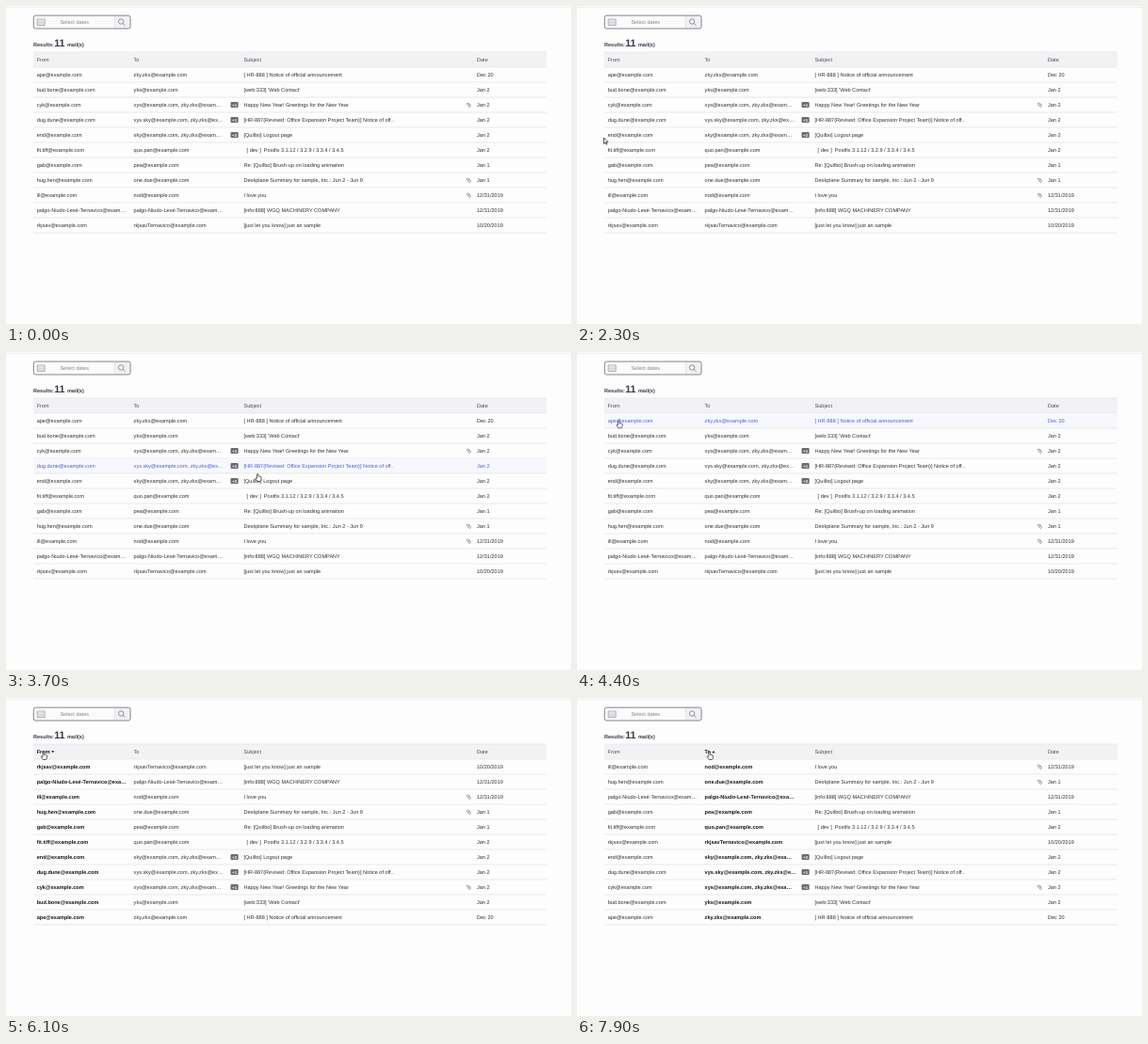
An HTML page for the animation above (8 s loop, 600x338 px).

```html
<!DOCTYPE html>
<html lang="en">
<head>
<meta charset="utf-8">
<title>Mail list</title>
<style>
  html, body { margin: 0; width: 100%; height: 100%; overflow: hidden; background: #fefdfe; }
  svg { display: block; }
  text { font: 5.57px "Liberation Sans", Arial, sans-serif; white-space: pre; text-rendering: geometricPrecision; fill: #303033; }
  .bold { font-weight: bold; fill: #161618; }
  .head text { fill: #4c4c50; }
  .head .bold { fill: #161618; }
  .results text { font-weight: bold; fill: #343a46; }
  .results .count { font-size: 10.8px; }
  .hint { fill: #85848a; }
  .badge { font-size: 4.4px; font-weight: bold; fill: #fff; }
  .hover text:not(.badge) { fill: #5757dc; }
  .icon { fill: none; stroke: #6c6b70; stroke-width: .7; }
</style>
</head>
<body>
<svg width="600" height="338" viewBox="0 0 600 338">
  <path d="M0 1.5H600" stroke="#efeef0"/>
  <rect x="29.3" y="10.1" width="102.8" height="13.9" rx="2.2" fill="#fbfafc"/>
  <path d="M115.5 10.1H129.9a2.2 2.2 0 0 1 2.2 2.2V21.8a2.2 2.2 0 0 1-2.2 2.2H115.5Z" fill="#f1f0f3"/>
  <path d="M115.5 10.6V23.5" stroke="#dddce0" stroke-width=".7"/>
  <rect x="29.3" y="10.1" width="102.8" height="13.9" rx="2.2" fill="none" stroke="#77767a" stroke-width=".9"/>
  <path class="icon" d="M33.2 14H41.2V20.6H33.2Z" style="stroke-width:.5"/>
  <path class="icon" d="M33.2 15.7H41.2M33.2 17.3H41.2M33.2 18.9H41.2M35.2 15.7V20.6M37.2 15.7V20.6M39.2 15.7V20.6" style="stroke-width:.2"/>
  <text class="hint" x="57.4" y="18.9">Select dates</text>
  <g class="icon"><circle cx="122.2" cy="16.5" r="2.7"/><path d="M124.2 18.5L126.6 20.9"/></g>
  <g class="results">
    <text x="29" y="43">Results:</text>
    <text class="count" x="51.2" y="43.2">11</text>
    <text x="64.9" y="43">mail(s)</text>
  </g>
  <g id="table"></g>
  <g id="cursor" fill="#fff" stroke="#111" stroke-width=".7" stroke-linejoin="round">
    <path id="arrow" d="M0 0V6.3L1.5 5L2.5 7.2L3.5 6.8L2.5 4.6H4.4Z"/>
    <path id="hand" transform="translate(.3 -.5) scale(.92)" d="M-.8 5.6V.8Q0-.4.8.8V3.4Q1.5 2.8 2 3.6Q2.7 3 3.1 3.9Q4 3.5 4.1 4.5V6.6Q3.8 8 3.2 9H-.6Q-1 7.8-2.6 5.9Q-2.5 4.4-.8 5.6Z"/>
  </g>
</svg>
<script>
const LOOP = 8000, STEP = 100, ROW = 16, TOP = 65;
const COLUMNS = [["From", 32.7], ["To", 135.6], ["Subject", 252.5], ["Date", 500]];
const at = name => name + "@example.com";
const longName = "palgo-Niudo-Lesé-Ternavico@exam…";

// from, to, subject, date, hidden recipients, attachment
const mails = [
  [at("ape"), at("zky.zks"), "[ HR-888 ] Notice of official announcement", "Dec 20"],
  [at("bud.bone"), at("yks"), "[web:333] 'Web Contact'", "Jan 2"],
  [at("cyk"), at("xys") + ", zky.zks@exam…", "Happy New Year! Greetings for the New Year", "Jan 2", 1, true],
  [at("dug.dune"), at("vys.sky") + ", zky.zks@ex…", "[HR-887(Revised: Office Expansion Project Team)] Notice of off..", "Jan 2", 1],
  [at("end"), at("sky") + ", zky.zks@exam…", "[Quilbo] Logout page", "Jan 2", 2],
  [at("fit.tiff"), at("quo.pan"), "  [ dev ]  Postfix 3.1.12 / 3.2.9 / 3.3.4 / 3.4.5", "Jan 2"],
  [at("gab"), at("pea"), "Re: [Quilbo] Brush-up on loading animation", "Jan 1"],
  [at("hug.hen"), at("one.due"), "Deskplane Summary for sample, Inc.: Jun 2 - Jun 9", "Jan 1", 0, true],
  [at("ill"), at("nod"), "I love you", "12/31/2019", 0, true],
  [longName, longName, "[info:888] WGQ MACHINERY COMPANY", "12/31/2019"],
  [at("rkjsav"), at("rkjsavTernavico"), "[just let you know] just an sample", "10/20/2019"]
];

// time, x, y of the pointer tip
const path = [
  [2300, 28.5, 140], [2500, 62, 128], [2800, 150, 97], [3100, 232, 74], [3200, 240, 76],
  [3500, 262, 104], [3700, 267, 129.6], [4000, 232, 185], [4100, 200, 194], [4300, 56, 79],
  [4400, 44, 73], [4700, 41.5, 64], [4900, 39.5, 59], [5100, 39.5, 57.7], [6800, 39.5, 57.7],
  [7000, 52, 58.5], [7400, 128, 58.5], [7600, 140, 58], [7700, 140.3, 57.7], [8000, 140.3, 57.7]
];

// time, sorted column, direction
const sorts = [[0, -1, 1], [5300, 0, 1], [6000, 0, -1], [6800, 0, 1], [7900, 1, 1]];

const table = document.getElementById("table");
const cursor = document.getElementById("cursor");
const arrow = document.getElementById("arrow");
const hand = document.getElementById("hand");

function pointer(t) {
  const next = path.findIndex(key => key[0] > t);
  if (next < 1) return null;
  const [t0, x0, y0] = path[next - 1], [t1, x1, y1] = path[next];
  const k = (t - t0) / (t1 - t0);
  return [x0 + (x1 - x0) * k, y0 + (y1 - y0) * k];
}

const label = (x, y, value, style = "") => `<text class="${style}" x="${x}" y="${y}">${value}</text>`;
const shorten = value => value.endsWith("…") ? value.slice(0, -2) + "…" : value;

function header(column, direction) {
  const cells = COLUMNS.map(([name, x], i) => label(x, 59.4, name, i === column ? "bold" : "")).join("");
  const tip = column < 0 ? "" :
    `<path d="M${column ? 145 : 49.7} 57.3m-1.8 ${direction}l1.8 ${-2 * direction}l1.8 ${2 * direction}z" fill="#222"/>`;
  return `<g class="head"><rect x="29" y="49" width="545" height="16" fill="#f2f1f4"/>
    <path d="M29 49H574M29 65H574" stroke="#e2e1e4" stroke-width=".7"/>${cells}${tip}</g>`;
}

function mailRow(mail, index, column, hovered) {
  const y = TOP + index * ROW;
  const cells = COLUMNS.map(([, x], i) => {
    const bold = i === column;
    return label(x, y + 9.9, bold ? shorten(mail[i]) : mail[i], bold ? "bold" : "");
  }).join("");
  const badge = mail[4] ? `<rect x="238.5" y="${y + 4.9}" width="8.2" height="6.2" rx="1" fill="#6c6b72"/>` +
    label(240.1, y + 9.6, "+" + mail[4], "badge") : "";
  const clip = mail[5] ? `<path class="icon" transform="translate(491.4 ${y + 8}) rotate(-35) scale(.82)"
    d="M1.4-1.8V1.9a1.4 1.4 0 0 1-2.8 0V-2.2a.9.9 0 0 1 1.8 0V1.6" style="stroke-width:.7"/>` : "";
  return `<g class="${hovered ? "hover" : ""}">
    ${hovered ? `<rect x="29" y="${y}" width="545" height="16" fill="#f7f8fd"/>` : ""}
    <path d="M29 ${y + ROW}H574" stroke="#dedde0" stroke-width=".7"/>${cells}${badge}${clip}</g>`;
}

let shown;
function draw(t) {
  const [, column, direction] = sorts.filter(s => s[0] <= t).pop();
  const spot = pointer(t), before = pointer(t - STEP); // hover trails the pointer by one step
  const hover = before && before[0] > 29 ? Math.floor((before[1] - TOP) / ROW) : -1;
  const state = [column, direction, hover].join();
  if (state !== shown) {
    shown = state;
    const rows = [...mails];
    if (column >= 0) rows.sort((a, b) => (a[column] < b[column] ? -1 : 1) * direction);
    table.innerHTML = header(column, direction) +
      rows.map((mail, i) => mailRow(mail, i, column, i === hover)).join("");
  }
  cursor.style.display = spot ? "" : "none";
  if (!spot) return;
  const overTable = spot[0] > 29;
  arrow.style.display = overTable ? "none" : "";
  hand.style.display = overTable ? "" : "none";
  cursor.setAttribute("transform", `translate(${spot})`);
}

const start = performance.now();
function tick() {
  const t = (performance.now() - start) % LOOP;
  draw(Math.floor(t / STEP) * STEP);
  requestAnimationFrame(tick);
}
tick();
</script>
</body>
</html>
```
